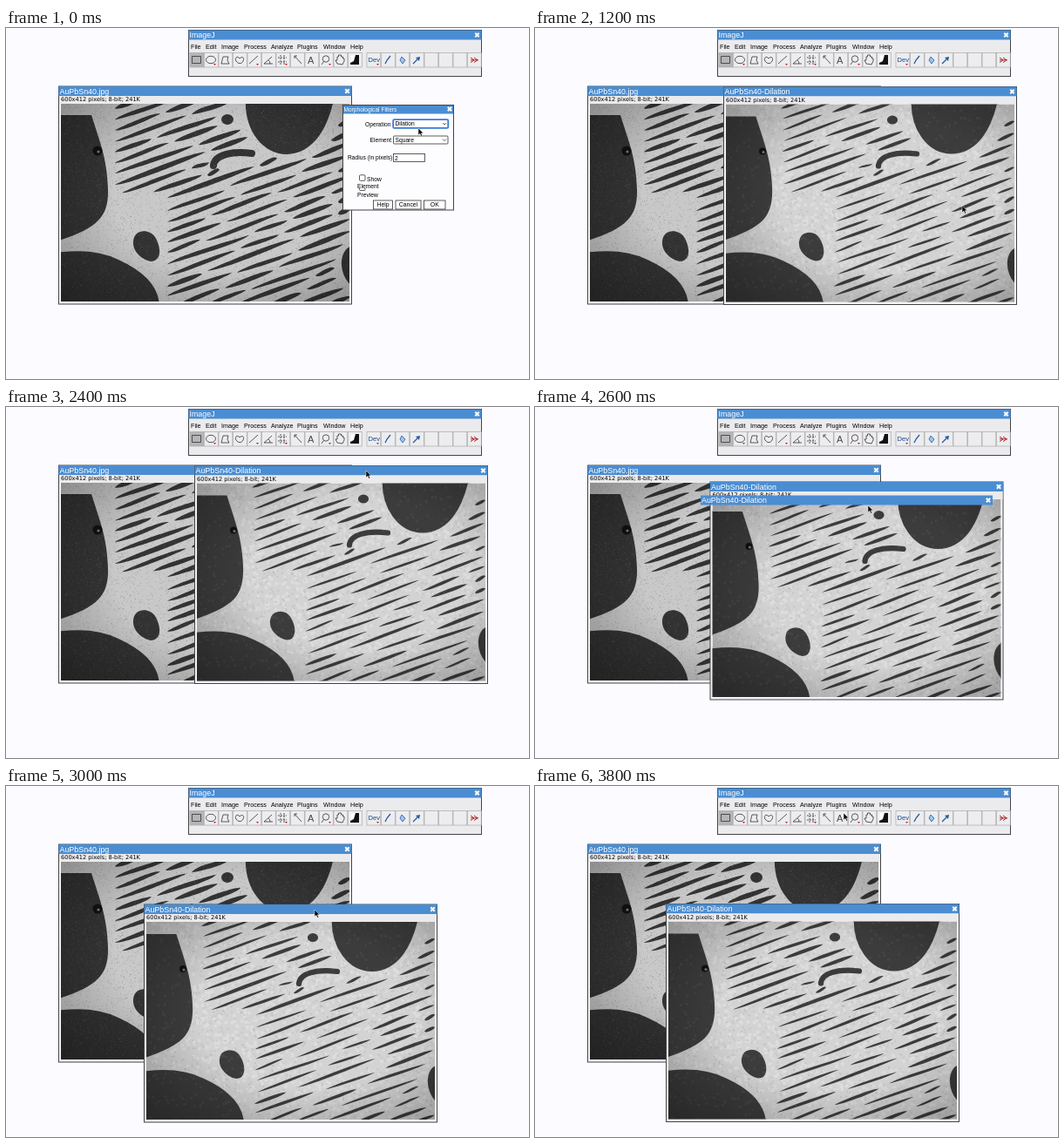
Write an HTML page that moves like this. It is 600 px wide and 403 px high and loops after 4000 ms.

```html
<!DOCTYPE html>
<html lang="en">
<head>
<meta charset="utf-8">
<title>Morphological dilation</title>
<style>
html, body { margin: 0; width: 100%; height: 100%; overflow: hidden; background: #fcfbff; }
svg { display: block; }
text { font-family: "Liberation Sans", Arial, sans-serif; white-space: pre; }
.info { font-family: "DejaVu Sans", Verdana, sans-serif; }
.box { fill: #fff; stroke: #333; stroke-width: .8; }
.icon { fill: none; stroke: #333; stroke-width: .8; }
</style>
</head>
<body>
<svg id="stage" width="600" height="403" viewBox="0 0 600 403"></svg>
<script>
const random = seed => () => (seed = seed * 16807 % 2147483647) / 2147483647;
const text = (x, y, s, size, more = '') => `<text x="${x}" y="${y}" font-size="${size}" ${more}>${s}</text>`;
const rect = (x, y, w, h, more = '') => `<rect x="${x}" y="${y}" width="${w}" height="${h}" ${more}/>`;
const path = (d, more = '') => `<path d="${d}" ${more}/>`;

const grains = `M-5 13H35C44 42 53 62 54 98C55 130 42 143 -5 158Z
  M-5 171Q38 165 66 179Q112 200 113 232H-5Z
  M212 -5C210 28 230 58 259 58C290 57 306 28 313 -5Z
  M83 158C84 144 101 143 108 153C116 166 115 181 103 181C93 179 82 170 83 158Z
  M184 18a7 6 0 1 1 14 0a7 6 0 1 1 -14 0Z
  M340 163C319 160 315 195 335 210Z`;

const inside = (x, y, cx, cy, rx, ry) => ((x - cx) / rx) ** 2 + ((y - cy) / ry) ** 2 < 1;

// Lamellae keep clear of the grains and the light matrix beside them
const isFree = (x, y) => x > (y < 103 ? 60 : 120) && x < 331 && y > -4 && y < 230 &&
  !inside(x, y, 262, 2, 60, 64) && !inside(x, y, 191, 18, 14, 13) &&
  !inside(x, y, 198, 64, 30, 14) && !inside(x, y, 331, 187, 18, 28);

const slope = -.36;

function lamella(x1, x2, base, rnd) {
  const t = 3 + rnd() * 1.3, bend = (rnd() - .5) * 6;
  const at = (k, off) => {
    const x = x1 + (x2 - x1) * k;
    return `${x.toFixed(1)} ${(base + slope * x + off).toFixed(1)}`;
  };
  return `M${at(0, 0)}C${at(.1, bend - t)} ${at(.85, -bend - t)} ${at(1, 0)}` +
    `C${at(.9, t - bend)} ${at(.15, t + bend)} ${at(0, 0)}Z`;
}

// Parallel rows, each broken into pieces of random length
function lamellae(rnd) {
  let d = '';
  for (let base = 28; base < 350; base += 12.5) {
    let start = 0, length = 0;
    for (let x = 54; x < 340; x += 2) {
      const free = isFree(x, base + slope * x);
      if (!start && free) {
        start = x;
        length = 35 + rnd() * 70;
      } else if (start && (!free || x - start > length)) {
        if (x - start > 10) d += lamella(start, x, base + rnd() * 3 - 1.5, rnd);
        start = 0;
        x += 4;
      }
    }
  }
  return d;
}

function specks(count, size, color, alpha, rnd) {
  let d = '';
  while (count--) d += `M${(rnd() * 331).toFixed(1)} ${(rnd() * 228).toFixed(1)}h0`;
  return path(d, `stroke="${color}" stroke-opacity="${alpha}" stroke-width="${size}" stroke-linecap="round"`);
}

function micrograph(dilated) {
  const rnd = random(71), shrink = dilated ? 1.8 : 0;
  const light = dilated ? '#d3d3d3' : '#c8c8c8', dark = dilated ? '#3c3c3c' : '#333';
  const shapes = path(grains + lamellae(rnd), `fill="${dark}" stroke="${light}" stroke-width="${shrink}"`) +
    path('M175 71C176 59 195 54 219 57', `fill="none" stroke="${dark}" stroke-linecap="round" stroke-width="${8 - shrink}"`);
  const grain = dilated
    ? specks(700, 3, '#fff', .05, rnd) + specks(700, 2.5, '#000', .06, rnd)
    : specks(4500, 1, '#000', .2, rnd) + specks(3500, 1, '#fff', .13, rnd);
  return '<svg x="3" y="20.5" width="331" height="227">' + rect(0, 0, 331, 228, `fill="${light}"`) +
    (dilated ? specks(1500, 4, '#fff', .22, rnd) + specks(1000, 2, '#000', .08, rnd) : '') + shapes + grain +
    `<circle cx="42" cy="54" r="${dilated ? 4 : 5.5}" fill="#111"/><circle cx="43" cy="55" r="1.6" fill="#777"/>` +
    rect(0, 0, 331, 228, 'fill="url(#shade)"') + '</svg>';
}

const closeMark = (x, y) => path(`M${x - 2.2} ${y - 2.2}l4.4 4.4m0 -4.4l-4.4 4.4`, 'stroke="#fff" stroke-width="2"');
const titleBar = (w, title) => rect(.5, .5, w - 1, 11, 'fill="#4a8dd2"') +
  text(1.5, 9.3, title, 8.9, 'fill="#fff"') + closeMark(w - 5.5, 6);

const imageWindow = (title, dilated) =>
  rect(.5, .5, 336, 250, 'fill="#f4f4f6" stroke="#444"') + titleBar(337, title) +
  rect(1, 11.5, 335, 9, 'fill="#ebebee"') +
  text(3, 17.7, '600x412 pixels; 8-bit; 241K', 6.6, 'class="info"') + micrograph(dilated);

function toolbar() {
  const menus = { File: 212, Edit: 229, Image: 247, Process: 273, Analyze: 304, Plugins: 334, Window: 364, Help: 395 };
  let s = rect(209.5, 2.5, 336, 53, 'fill="#ebebee" stroke="#444"') +
    `<g transform="translate(209 2)">${titleBar(337, 'ImageJ')}</g>`;
  for (const m in menus) s += text(menus[m], 23.5, m, 7.2);
  for (let i = 0; i < 20; i++) {
    const x = 211 + i * 16.5 + (i > 11 ? 5 : 0);
    s += rect(x, 28.5, 15.8, 16.5, `fill="${i ? '#ededf0' : '#b5b5b8'}" stroke="#aaa" stroke-width=".7"`);
  }
  for (const x of [238, 287, 320, 370, 425]) s += path(`M${x} 41h3l-1.5 2z`, 'fill="#c22"');
  return s +
    path('M213.5 32.5h10v8h-10zM249 33h6l-1 4 2 4h-9l1 -4z', 'class="icon"') +
    path('M268 35c-3 -4 -6 0 -4 3s6 4 8 0 -1 -6 -4 -3zM279 41l10 -9M305 33l-9 8h10M301 37q2 1 2 4', 'class="icon"') +
    path('M312 34h10M312 39h10M315 31v11M319 31v11', 'class="icon" stroke-dasharray="2 1"') +
    path('M331 32l8 9M331 35v-3h3M364.5 38.5l-2.5 3.5', 'class="icon"') +
    '<ellipse class="icon" cx="235" cy="36.5" rx="5.5" ry="4.2"/><circle class="icon" cx="367" cy="35.5" r="3.7"/>' +
    path('M380 41l-2 -4 2 0v-4h1.5v-2h3v2h2v2h1.5v3l-2 4z', 'class="icon"') +
    text(346, 40.5, 'A', 11, 'fill="#444"') +
    rect(395.5, 31.5, 9, 10, 'fill="#fff"') + path('M395 42v-2l4 -2 2 -7h4v11z', 'fill="#111"') +
    text(415.5, 39, 'Dev', 7.6, 'fill="#174a8c"') +
    path('M435 41l2 -4 4 -5M467 41l5 -5', 'fill="none" stroke="#245a9c" stroke-width="1.3"') +
    path('M452 37l2 -4 4 4 -3 4z', 'fill="#9ec5ee" stroke="#245a9c" stroke-width=".8"') +
    path('M470 34l5 -1 -1 5z', 'fill="#245a9c"') +
    path('M533 34l4 2.8 -4 2.8M537 34l4 2.8 -4 2.8M533 36.8h9', 'stroke="#a22" fill="none"') +
    text(210, 52.8, 'Morphological Filters: 0.046 seconds, 5.4 million pixels/second', 7.15, 'id="status" class="info" fill="#222"');
}

function dialog() {
  const label = (x, y, s) => text(x, y, s, 6.7);
  const select = (y, s) => rect(444.5, y, 62.5, 9, 'class="box" rx="1"') + label(446.5, y + 6.8, s) +
    path(`M501 ${y + 3.6}l2 2 2 -2`, 'class="icon"');
  const check = y => rect(405.5, y, 6.5, 6.5, 'class="box" rx="1"');
  const button = (x, w, s, more = '') => rect(x, 198, w, 10, `class="box" ${more}`) +
    text(x + w / 2, 205.4, s, 6.9, 'text-anchor="middle"');
  return rect(386.5, 88.5, 127, 120.5, 'fill="#fdfdff" stroke="#444"') +
    rect(387, 89, 126, 9.5, 'fill="#4a8dd2"') + text(387.5, 95.5, 'Morphological Filters', 6.6, 'fill="#fff"') +
    closeMark(509, 93) + '<g id="fields">' +
    label(412, 112.5, 'Operation') + select(105.5, 'Dilation') +
    `<g id="focus">${rect(444, 105, 63.5, 10, 'rx="1.5" fill="none" stroke="#3f7fdc" stroke-width="1.5"')}</g>` +
    label(417.5, 130.5, 'Element') + select(124, 'Square') +
    label(392, 151.3, 'Radius (in pixels)') + rect(444.5, 144.5, 36, 9, 'class="box"') + label(446, 151.5, '2') +
    check(168.8) + label(414, 176, 'Show') +
    check(180) + rect(403, 178.5, 25, 5.6, 'fill="#fdfdff"') + label(403, 183.8, 'Element') +
    rect(403, 187.5, 25, 7, 'fill="#fdfdff"') + label(403, 194.3, 'Preview') +
    button(421.5, 22, 'Help') + button(447, 29, 'Cancel') + button(479.5, 24.5, 'OK', 'id="ok"') + '</g>';
}

document.getElementById('stage').innerHTML = `
  <defs><radialGradient id="shade" cx=".56" cy=".46" r=".75">
    <stop offset=".5" stop-opacity="0"/><stop offset="1" stop-opacity=".32"/>
  </radialGradient></defs>
  <g transform="translate(60 66.5)">${imageWindow('AuPbSn40.jpg', false)}</g>
  <g id="result">${imageWindow('AuPbSn40-Dilation', true)}</g>
  <g id="ghost">${titleBar(336, 'AuPbSn40-Dilation')}</g>
  <g id="dialog">${dialog()}</g>${toolbar()}
  <path id="cursor" d="M0 0V8L1.9 6.3 3.3 9.2 4.6 8.6 3.3 5.8H5.8Z" fill="#000" stroke="#fff" stroke-width=".5"/>`;

const el = id => document.getElementById(id);
const show = (id, on) => el(id).style.display = on ? '' : 'none';
const move = (id, x, y) => el(id).setAttribute('transform', `translate(${x} ${y})`);

// Key points: time, x, y
const pointerKeys = [[0, 473, 115], [200, 463, 131], [400, 479, 180], [800, 490, 203], [1400, 490, 204],
  [1800, 414, 77], [2400, 413, 73], [2600, 382, 113], [3000, 354, 142], [3200, 346, 141], [3600, 354, 34], [3800, 354, 31]];
const windowKeys = [[0, 216, 67], [2400, 216, 67], [2600, 200.5, 85.5], [2800, 164, 133], [3000, 158, 135.5], [3200, 150, 135]];

// Decelerating travel from each key point to the next
function track(keys, t) {
  const i = keys.findLastIndex(k => k[0] <= t), [t0, x0, y0] = keys[i], [t1, x1, y1] = keys[i + 1] || [4000, x0, y0];
  const k = Math.sin((t - t0) / (t1 - t0) * Math.PI / 2);
  return [x0 + (x1 - x0) * k, y0 + (y1 - y0) * k];
}

let last;
function frame(now) {
  const t = Math.floor(now % 4000 / 200) * 200;
  if (t !== last) {
    last = t;
    const [x, y] = track(pointerKeys, t);
    move('cursor', x, y);
    move('ghost', x - 192.5, y - 12);
    move('result', ...track(windowKeys, t));
    move('fields', 0, t < 1000 ? 0 : -.6);
    el('ok').style.strokeWidth = t < 1000 ? .8 : 1.4;
    show('focus', t < 1000);
    show('dialog', t < 1200);
    show('result', t >= 1200);
    show('status', t === 1400);
    show('ghost', t === 2600);
  }
  requestAnimationFrame(frame);
}
requestAnimationFrame(frame);
</script>
</body>
</html>
```
